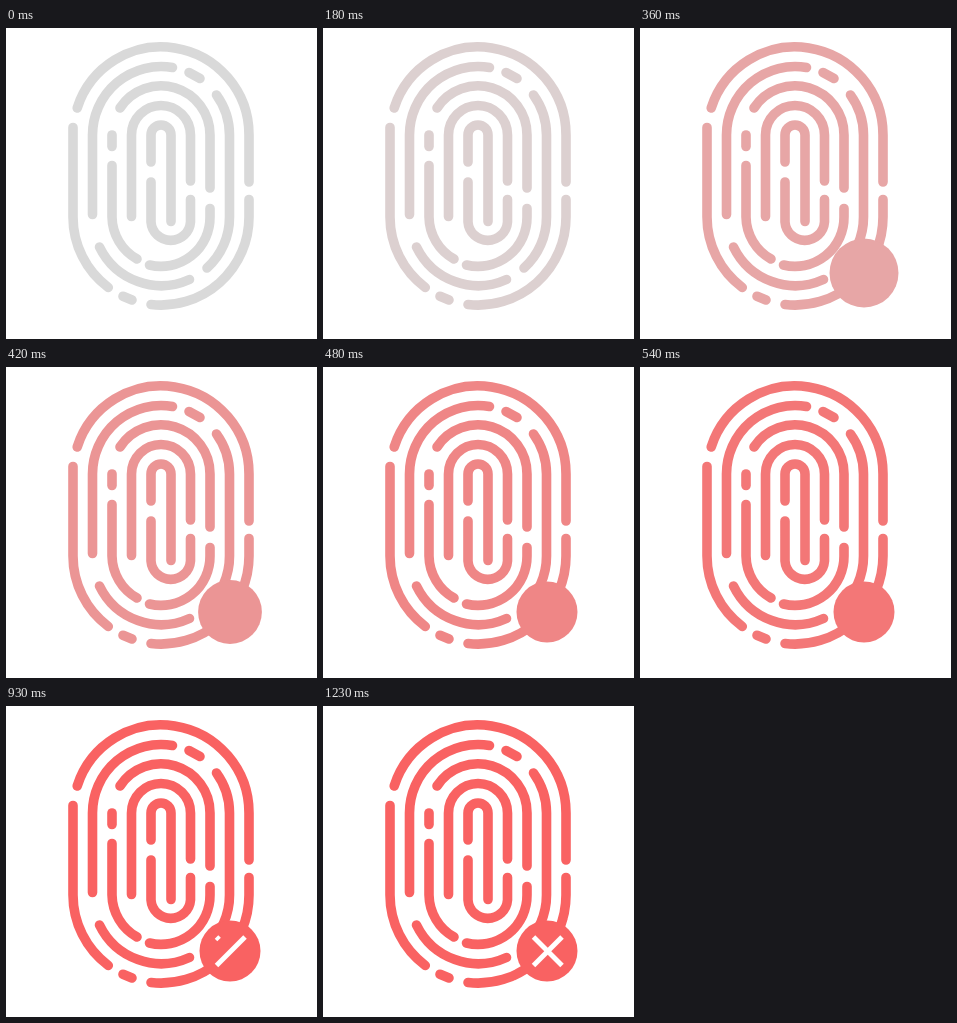
These frames come from a looping animation (311x311 px, 1260 ms). An HTML page:

```html
<!DOCTYPE html>
<html lang="en">
<head>
<meta charset="utf-8">
<title>Fingerprint rejected</title>
<style>
  html, body { margin: 0; width: 100%; height: 100%; overflow: hidden; background: #fff; }
  svg { display: block; width: 100vw; height: 100vh; }
</style>
</head>
<body>
<svg viewBox="0 0 311 311">
  <g id="print" fill="none" stroke-width="9.6" stroke-linecap="round">
    <!-- outer ring -->
    <path d="M71.2 80A88 88 0 0 1 243 107V154"/>
    <path d="M67 99.5V189A88 88 0 0 0 102.3 259.5"/>
    <path d="M243 171.5V189A88 88 0 0 1 145 276.5"/>
    <path d="M117 268.3L126 272"/>
    <!-- second ring -->
    <path d="M86.5 186.5V107A68.5 68.5 0 0 1 166.5 39.5"/>
    <path d="M183 44.5L194 50.5"/>
    <path d="M210.5 67A68.5 68.5 0 0 1 223.5 107V189A68.5 68.5 0 0 1 201 240"/>
    <path d="M93.5 219A68.5 68.5 0 0 0 183.5 251.5"/>
    <!-- third ring -->
    <path d="M114 80A49 49 0 0 1 204 107V160"/>
    <path d="M106 107V118.5"/>
    <path d="M106 137.5V189A49 49 0 0 0 131 231"/>
    <path d="M204 180.5V189A49 49 0 0 1 143.5 237"/>
    <!-- core -->
    <path d="M125.5 188.5V107A29.5 29.5 0 0 1 184.5 107V153"/>
    <path d="M145 134V107A10 10 0 0 1 165 107V193.5"/>
    <path d="M145 154V194A19.8 19.8 0 0 0 184.5 194V171.5"/>
  </g>
  <circle id="badge" cx="224" cy="245"/>
  <g stroke="#fff" stroke-width="5">
    <line id="slash" x1="239" y1="231"/>
    <line id="back" x1="210.5" y1="231"/>
  </g>
</svg>
<script>
const LOOP = 1260, STEP = 30;
const GREY = [217, 217, 217], RED = [249, 98, 98];
const el = id => document.getElementById(id);
const print = el('print'), badge = el('badge'), slash = el('slash'), back = el('back');

const span = (t, a, b) => Math.min(1, Math.max(0, (t - a) / (b - a)));
const ease = u => 0.5 - 0.5 * Math.cos(Math.PI * u);
const mix = (a, b, u) => a + (b - a) * u;

function stroke(line, endX, u) {
  line.setAttribute('x2', mix(+line.getAttribute('x1'), endX, u));
  line.setAttribute('y2', mix(231, 259.5, u));
  line.setAttribute('visibility', u > 0 ? 'visible' : 'hidden');
}

function draw(t) {
  const u = span(t, 120, 660);
  const tint = mix(u, ease(u), 0.4);
  const color = `rgb(${GREY.map((g, i) => Math.round(mix(g, RED[i], tint)))})`;
  print.setAttribute('stroke', color);
  badge.setAttribute('fill', color);

  // badge pops past its size, then settles
  const r = 35 * ease(span(t, 240, 370)) - 4.5 * ease(span(t, 370, 450));
  badge.setAttribute('r', r);

  stroke(slash, 210.5, span(t, 570, 900));
  stroke(back, 239, span(t, 900, 1230));
}

const start = performance.now();
function tick() {
  const t = (performance.now() - start) % LOOP;
  draw(Math.floor(t / STEP) * STEP);
  requestAnimationFrame(tick);
}
tick();
</script>
</body>
</html>
```
